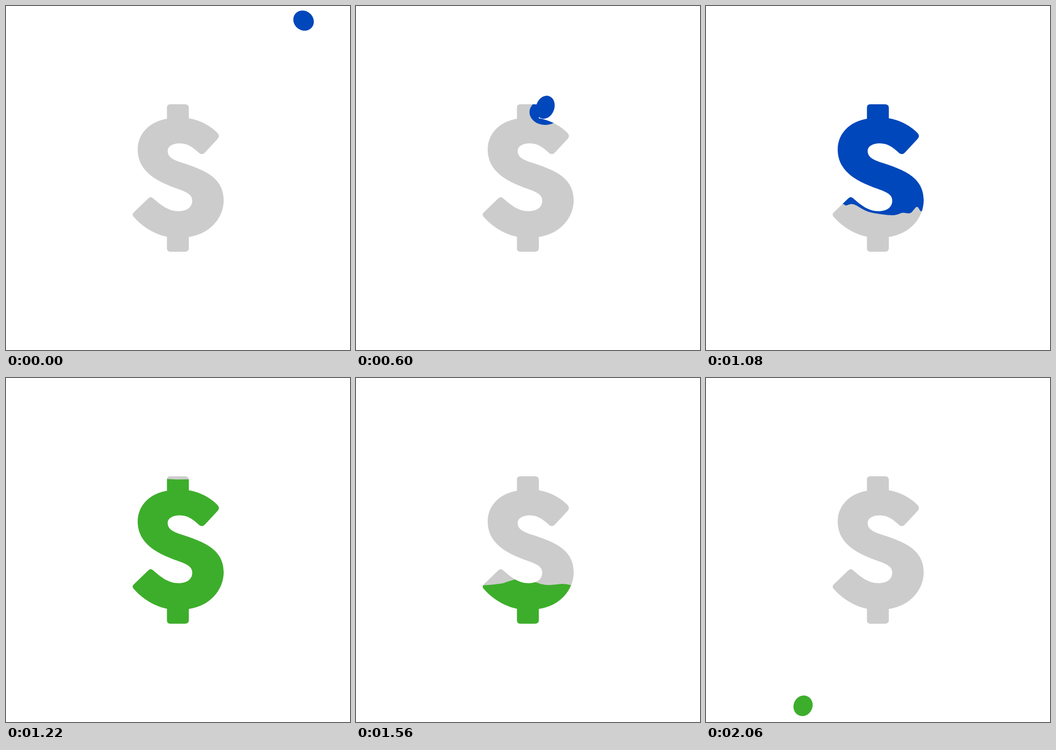
An HTML page with a canvas that plays this animation: 700x700 px, repeating every 2.08 s.

```html
<!DOCTYPE html>
<html lang="en">
<head>
<meta charset="utf-8">
<title>Dollar drop</title>
<style>
html, body { margin: 0; width: 100%; height: 100%; overflow: hidden; background: #fff; }
canvas { display: block; width: 100vmin; height: 100vmin; margin: 0 auto; }
</style>
</head>
<body>
<canvas id="stage" width="700" height="700"></canvas>
<script>
const ctx = document.getElementById('stage').getContext('2d');
const LOOP = 2080, STEP = 20, PERIOD = 190;
const GREY = '#cccccc', BLUE = [0, 71, 187], GREEN = [61, 174, 43];

const dollar = new Path2D(
  'M327.5 229.5V207Q327.5 200 334 200H364Q372 200 372 207V228.5' +
  'C395 232 418 245 431 259Q435.500 265 431 270L405 298Q400 303.500 394 300' +
  'C381 288 370 279.500 354 279.500C337 279.500 329 287 329 295' +
  'C329 309 343 314 360 319.500C401 333 443 348 443 395C443 432 414 464 372 470' +
  'V493Q372 500 364 500H334Q327.500 500 327.500 493V469.500' +
  'C300 464 275 447 259 428Q256 424 260 420L289 392Q294 386.500 299 391' +
  'C314 404 330 417.500 351 417.500C370 417.500 379 408 379 396' +
  'C379 383 366 378 348 371.500C310 358 268 338 268 292C268 259 293 235 327.500 229.500Z');

// Surface shapes: x, offset from the mean level
const choppy = [[259, -5], [277, -13], [285, -10], [301, -12], [332, 3.5],
  [379, 10], [400, 5], [416, 5.5], [429, -7], [438, 2]];
const gentle = [[270, 6.5], [286, 2], [308, -3.5], [330, 0], [362, 9], [398, 7], [420, 10]];

const clamp = v => Math.max(0, Math.min(1, v));
const mix = (a, b, k) => a + (b - a) * k;
const rgb = c => `rgb(${c.map(Math.round).join(',')})`;

// Rows of [time, ...values], linear in between
function track(rows, t) {
  let i = 0;
  while (i < rows.length - 2 && t > rows[i + 1][0]) i++;
  const a = rows[i], b = rows[i + 1], k = clamp((t - a[0]) / (b[0] - a[0]));
  return a.slice(1).map((v, j) => mix(v, b[j + 1], k));
}

function drop(color, x, y, [long, short, deg]) {
  ctx.fillStyle = rgb(color);
  ctx.beginPath();
  ctx.ellipse(x, y, long, short, deg * Math.PI / 180, 0, Math.PI * 2);
  ctx.fill();
}

// Smooth repeating surface, closed along the edge at y = side
function surface(shape, level, amp, shift, side) {
  const pts = [];
  for (let n = -2; n <= 2; n++)
    for (const [x, y] of shape) pts.push([x + n * PERIOD + shift, level + y * amp]);
  ctx.beginPath();
  ctx.moveTo(pts[1][0], side);
  ctx.lineTo(...pts[1]);
  for (let i = 1; i < pts.length - 2; i++) {
    const [p, a, b, q] = pts.slice(i - 1, i + 3);
    ctx.bezierCurveTo(
      a[0] + (b[0] - p[0]) / 6, a[1] + (b[1] - p[1]) / 6,
      b[0] - (q[0] - a[0]) / 6, b[1] - (q[1] - a[1]) / 6, b[0], b[1]);
  }
  ctx.lineTo(pts[pts.length - 2][0], side);
  ctx.closePath();
}

function pour(t) {
  const u = t - 600, k = u / 200;
  const level = 242 + 0.17 * u + 0.0004 * u * u;
  const amp = clamp(k);
  ctx.save();
  if (k < 1) {
    const grow = Math.exp(4 * k), ry = 26 * grow;
    ctx.beginPath();
    ctx.ellipse(385, level + 30 * amp - ry, 32 * grow, ry, 0, 0, Math.PI * 2);
    ctx.clip();
  }
  surface(choppy, level, amp, (t - 1080) * 0.12, 0);
  ctx.fillStyle = rgb(BLUE.map((v, i) => mix(v, GREEN[i], clamp((t - 1180) / 40))));
  ctx.fill();
  ctx.restore();
}

function drain(t) {
  const level = 290 + (t - 1360) * 0.61;
  const amp = clamp((t - 1200) / 100);
  surface(gentle, level, amp, (t - 1360) * 0.12, 700);
  ctx.fillStyle = rgb(GREEN);
  ctx.fill();
}

function blueDrop(t) {
  const shape = track([[0, 21.8, 19.6, 40], [280, 23.6, 18.8, 55],
    [540, 24.3, 18.6, 98], [600, 24, 18.6, 110], [720, 20, 18, 120]], t);
  let x = 605.5 - 0.245 * t - 0.000292 * t * t;
  let y = 29.7 + 0.0443 * t + 0.000467 * t * t;
  if (t > 540) [x, y] = track([[540, 388, 190], [600, 385, 206], [720, 360, 252]], t);
  drop(BLUE, x, y, shape);
}

function greenDrop(t) {
  const u = t - 1740;
  const shape = track([[1660, 14, 14, 10], [1740, 21.3, 19.7, 20],
    [1900, 22, 19, 70], [2060, 21.3, 19.2, 115]], t);
  const x = Math.min(350, 329.5 - 0.4125 * u);
  const y = 520.5 + 0.35 * u + 0.000337 * u * u;
  drop(GREEN, x, y, shape);
}

function draw(t) {
  ctx.globalCompositeOperation = 'source-over';
  ctx.clearRect(0, 0, 700, 700);
  ctx.fillStyle = GREY;
  ctx.fill(dollar);
  ctx.globalCompositeOperation = 'source-atop';
  if (t >= 560 && t < 1220) pour(t);
  else if (t >= 1220 && t < 1740) drain(t);
  ctx.globalCompositeOperation = 'source-over';
  if (t <= 720) blueDrop(t);
  else if (t >= 1660) greenDrop(t);
  ctx.globalCompositeOperation = 'destination-over';
  ctx.fillStyle = '#fff';
  ctx.fillRect(0, 0, 700, 700);
}

const start = performance.now();
function tick() {
  const t = (performance.now() - start) % LOOP;
  draw(Math.floor(t / STEP) * STEP);
  requestAnimationFrame(tick);
}
tick();
</script>
</body>
</html>
```
